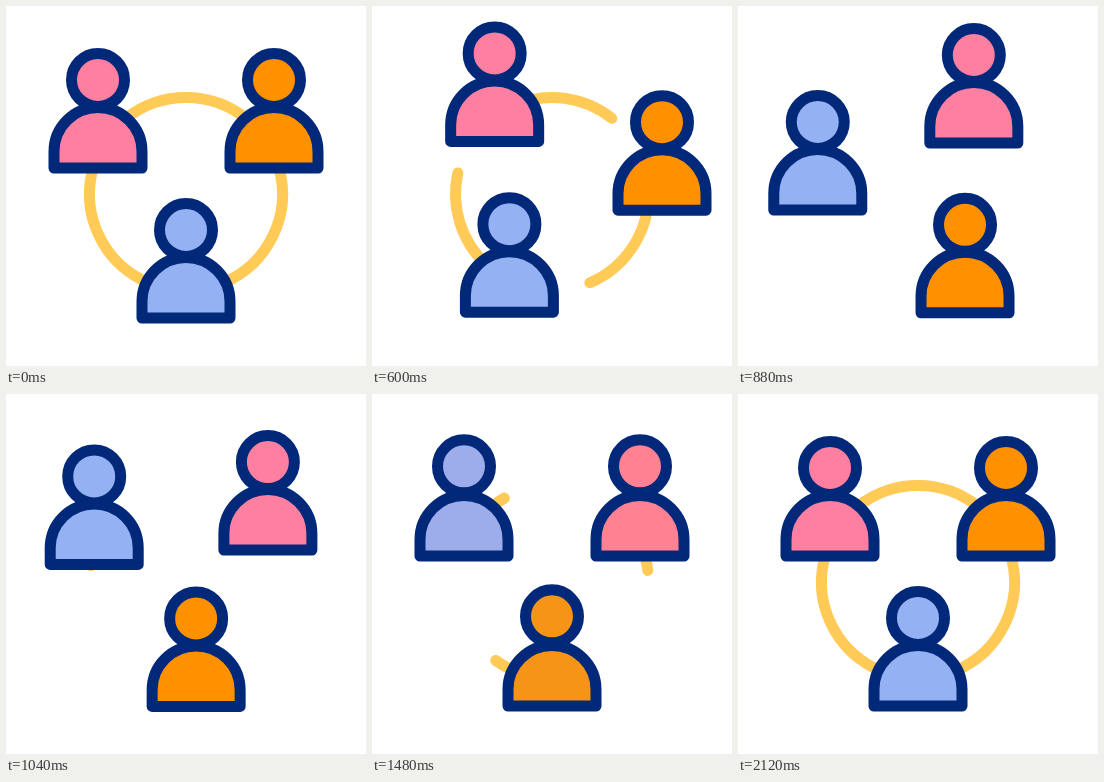
Animation of 360x360 px, one loop 2.16 s. Source, as an HTML page:

```html
<!DOCTYPE html>
<html lang="en">
<head>
<meta charset="utf-8">
<title>People in a circle</title>
<style>
  html, body { margin: 0; width: 100%; height: 100%; overflow: hidden; background: #fff; }
  svg { display: block; width: 100vw; height: 100vh; }
  .person { stroke: #02287a; stroke-width: 11; stroke-linejoin: round; }
  .arc { fill: none; stroke: #ffca55; stroke-width: 11; stroke-linecap: round; }
</style>
</head>
<body>
<svg viewBox="0 0 360 360"></svg>
<script>
const LOOP = 2160, STEP = 40;
const MOVE = [260, 1210], GROW = [1340, 2020], FADE = [1340, 2100], NOD = [1340, 2140];
const RING = { x: 180, y: 188, r: 96.5 };
const SLOTS = [[92, 74], [268, 74], [180, 224]];
const COLORS = [[255, 127, 160], [255, 145, 0], [147, 177, 243]];
const ARCS = [[-128, -51.7], [-16, 66.9], [117.4, 192.6]];
// Handles along the way (start, end) and outward bulge of each path
const BENDS = [[45, 54, 55], [28, 40, 83.5], [33, 46, 70]];

const svg = document.querySelector('svg');
function add(parent, tag, attrs = {}) {
  const el = document.createElementNS('http://www.w3.org/2000/svg', tag);
  for (const key in attrs) el.setAttribute(key, attrs[key]);
  return parent.appendChild(el);
}

const arcs = ARCS.map(() => add(svg, 'path', { class: 'arc' }));
const people = SLOTS.map(() => {
  const group = add(svg, 'g', { class: 'person' });
  add(group, 'path', { d: 'M-44 88V71.5a44 44 0 0 1 88 0V88Z' });
  const head = add(group, 'circle', { r: 26.5 });
  return { group, head };
});

const mix = (a, b, k) => a + (b - a) * k;
const span = (time, [from, to]) => Math.min(1, Math.max(0, (time - from) / (to - from)));
const smooth = p => p * p * (3 - 2 * p);
const cubic = (a, b, c, d, t) => {
  const s = 1 - t;
  return s * s * s * a + 3 * s * s * t * b + 3 * s * t * t * c + t * t * t * d;
};

// Same curve as cubic-bezier(.6, 0, .4, 1)
function ease(p) {
  let low = 0, high = 1;
  for (let i = 0; i < 24; i++) {
    const s = (low + high) / 2;
    if (cubic(0, 0.6, 0.4, 1, s) < p) low = s; else high = s;
  }
  return smooth((low + high) / 2);
}

function place(i, t) {
  const a = SLOTS[i], b = SLOTS[(i + 1) % 3];
  const [d1, d2, bulge] = BENDS[i];
  const dx = b[0] - a[0], dy = b[1] - a[1], len = Math.hypot(dx, dy);
  const along = [dx / len, dy / len], out = [dy / len, -dx / len];
  return [0, 1].map(k => cubic(
    a[k],
    a[k] + d1 * along[k] + bulge * out[k],
    b[k] - d2 * along[k] + bulge * out[k],
    b[k], t));
}

function ringPoint(deg) {
  const a = deg * Math.PI / 180;
  return `${RING.x + RING.r * Math.cos(a)} ${RING.y + RING.r * Math.sin(a)}`;
}

function draw(time) {
  const move = time >= MOVE[1] ? 1 : time <= MOVE[0] ? 0 : ease(span(time, MOVE));
  const grow = smooth(span(time, GROW));
  const fade = smooth(span(time, FADE));
  const nod = 6.3 * (1 - Math.cos(2 * Math.PI * span(time, NOD))) / 2;
  const growing = time >= GROW[0];
  const from = growing ? 0 : move, to = growing ? grow : 1;

  arcs.forEach((arc, i) => {
    const [a, b] = ARCS[i];
    const path = to - from < 0.002 ? ''
      : `M${ringPoint(mix(a, b, from))}A${RING.r} ${RING.r} 0 0 1 ${ringPoint(mix(a, b, to))}`;
    arc.setAttribute('d', path);
  });

  people.forEach(({ group, head }, i) => {
    const next = COLORS[(i + 1) % 3];
    const color = COLORS[i].map((c, k) => Math.round(mix(c, next[k], fade)));
    group.setAttribute('transform', `translate(${place(i, move).join(' ')})`);
    group.setAttribute('fill', `rgb(${color})`);
    head.setAttribute('cy', -nod);
  });
}

const start = performance.now();
function tick() {
  const time = (performance.now() - start) % LOOP;
  draw(Math.floor(time / STEP) * STEP);
  requestAnimationFrame(tick);
}
tick();
</script>
</body>
</html>
```
